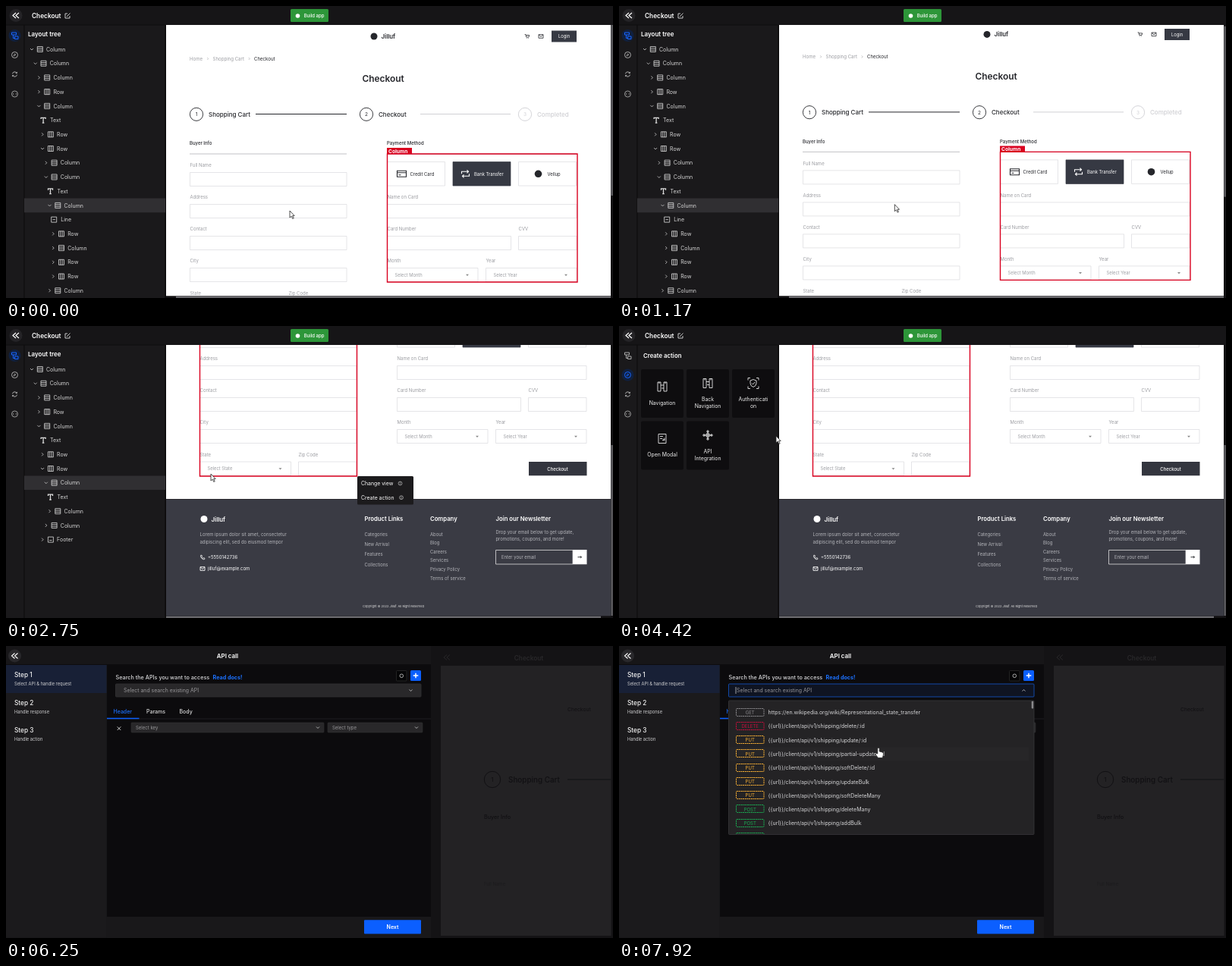
Recreate the animation shown at these times as an HTML page with a canvas. Size 800 px wide and 385 px high, loop 8 s.

```html
<!DOCTYPE html>
<html lang="en">
<head>
<meta charset="utf-8">
<title>App builder walkthrough</title>
<style>
html, body { margin: 0; width: 100%; height: 100%; overflow: hidden; background: #1a191b; }
canvas { display: block; }
</style>
</head>
<body>
<canvas id="stage" width="800" height="385"></canvas>
<script>
const LOOP = 8000;
const ctx = document.getElementById('stage').getContext('2d');
const BAR = '#161517', PANEL = '#1a191b', DARK = '#363943', BLUE = '#0b5fff', RED = '#d9001f',
      INK = '#25262b', LABEL = '#9c9da2', LIGHT = '#dadade', WHITE = '#fff', FOOT = '#b4b5ba';

// Drawing helpers
function text(s, x, y, size, color, weight = 400, align = 'left') {
  ctx.font = `${weight} ${size}px Inter, sans-serif`;
  ctx.fillStyle = color;
  ctx.textAlign = align;
  ctx.textBaseline = 'alphabetic';
  ctx.fillText(s, x, y + size * 0.38);
}
function rect(x, y, w, h, fill, stroke, width = 0.7, r = 0) {
  ctx.beginPath();
  ctx.roundRect(x, y, w, h, r);
  paint(fill, stroke, width);
}
function circle(x, y, r, fill, stroke, width = 0.8) {
  ctx.beginPath();
  ctx.arc(x, y, r, 0, 7);
  paint(fill, stroke, width);
}
function paint(fill, stroke, width) {
  if (fill) { ctx.fillStyle = fill; ctx.fill(); }
  if (stroke) { ctx.strokeStyle = stroke; ctx.lineWidth = width; ctx.stroke(); }
}
function path(d, x, y, stroke, width = 0.9, fill) {
  ctx.save();
  ctx.translate(x, y);
  const p = new Path2D(d);
  if (fill) { ctx.fillStyle = fill; ctx.fill(p); }
  if (stroke) { ctx.strokeStyle = stroke; ctx.lineWidth = width; ctx.stroke(p); }
  ctx.restore();
}
function clipped(x, y, w, h, draw) {
  ctx.save();
  ctx.beginPath();
  ctx.rect(x, y, w, h);
  ctx.clip();
  draw();
  ctx.restore();
}
const hline = (x1, x2, y, color, width) => path(`M${x1} 0H${x2}`, 0, y, color, width);
const chevron = (x, y, open, color, up) =>
  path(up ? 'M-2 1L0-1L2 1' : open ? 'M-2-1L0 1L2-1' : 'M-1-2L1 0L-1 2', x, y, color);

// Eased value from [time, value] stops
function tween(t, stops) {
  let [t0, v0] = stops[0];
  for (const [t1, v1] of stops) {
    if (t < t1) {
      const k = Math.max(0, (t - t0) / (t1 - t0));
      return v0 + (v1 - v0) * k * k * (3 - 2 * k);
    }
    [t0, v0] = [t1, v1];
  }
  return v0;
}

// Icons
const ICON = {
  C: 'M-3.5-3.5H3.5V3.5H-3.5ZM-3.5-1.2H3.5M-3.5 1.2H3.5',
  R: 'M-3.5-3.5H3.5V3.5H-3.5ZM-1.2-3.5V3.5M1.2-3.5V3.5',
  L: 'M-3.5-3.5H3.5V3.5H-3.5ZM-1.7 0H1.7',
  F: 'M-3.5-3.5H3.5V3.5H-3.5ZM-1.7 1H1.7',
  T: 'M-3-1.5V-3.3H3V-1.5M0-3.3V3.5M-1.3 3.5H1.3',
  back: 'M0-3.5L-4 0L0 3.5M4-3.5L0 0L4 3.5',
  edit: 'M0-3H-3V3H3V0M-1 1L3.5-3.5',
  mail: 'M-3-2.3H3V2.3H-3ZM-3-2.3L0 .5L3-2.3',
  cart: 'M-3.3-2.5H-2L-1.3 1H2L2.7-1.5H-1.7M-1 2.5H-.4M1.4 2.5H2',
  phone: 'M-2.3-2.7L-1-2.7L-.5-1L-1.2-.4Q-.4 1 .6 1.3L1.2.6L2.8 1.1V2.4Q1.5 3.5-.8 1.6T-2.3-2.7Z',
  swap: 'M-5 0V-3H4M2-5L4-3L2-1M5 0V3H-4M-2 1L-4 3L-2 5',
  card: 'M-6-4H6V4H-6ZM-6-1.5H6M-4 1.5H-1',
  sync: 'M-3-.6A3 3 0 0 1 2.7-1.4M3 .6A3 3 0 0 1-2.7 1.4M1.2-1.4H2.9V-3.1M-1.2 1.4H-2.9V3.1',
  pages: 'M-6-6H-2V6H-6ZM6-6H2V6H6ZM-2-2H2M-1 2H2M-4-6V-4M4-6V-4',
  shield: 'M0-5L4-3.5V0Q4 3.5 0 5Q-4 3.5-4 0V-3.5ZM-2 0L-.5 1.5L2-1.5M-7-4V-7H-4M7-4V-7H4M-7 4V7H-4M7 4V7H4',
  modal: 'M-5-6H5V6H-5ZM-3-3H1M-3 0H0M1 0L3 2M3-1V2H0',
  hub: 'M0-5V5M-5 0H5M-2-2H2V2H-2ZM-1-6H1V-4H-1ZM-1 4H1V6H-1ZM-6-1H-4V1H-6ZM4-1H6V1H4Z',
  arrow: 'M0 0V9L2.2 7.2L3.8 10.5L5.2 9.8L3.6 6.6H6.2Z',
  hand: 'M-1.2 8V1Q0-1 1.2 1V5L5 6Q7 6.5 6.4 9.5L5.3 13.5H-.5L-4 8.8Q-3.5 7-1.2 8Z'
};
const icon = (name, x, y, color, width) => path(ICON[name], x, y, color, width);

// Tree rows: arrow state, kind, depth; "*" marks the selected row
const HEAD = 'vC0 vC1 >C2 >R2 vC2 -T3 >R3 vR3 ';
const TREES = {
  payment: HEAD + '>C4 vC4 -T5 vC5* -L6 >R6 >C6 >R6 >R6 >C5',
  fields: HEAD + 'vC4 -T5 vC5* -L6 >C6 >C6 >C6 >C6 >R6 >C4',
  buyer: HEAD + 'vC4* -T5 >C5 >C4 >F3'
};
const KIND = { C: 'Column', R: 'Row', T: 'Text', L: 'Line', F: 'Footer' };

function drawTree(name) {
  text('Layout tree', 29, 37, 8, WHITE, 600);
  TREES[name].split(' ').forEach(([arrow, kind, depth, mark], i) => {
    const x = 34 + 4.7 * depth, y = 57 + 18.72 * i, leaf = arrow === '-';
    if (mark) rect(24, y - 9.3, 186, 18.6, '#302f32');
    if (!leaf) chevron(x, y, arrow === 'v', '#bbb');
    icon(kind, x + (leaf ? 1 : 10.8), y, '#ddd', kind === 'T' ? 1.3 : 0.8);
    text(KIND[kind], x + (leaf ? 10 : 19), y, 7, '#d6d6d6');
  });
}

function drawActions() {
  text('Create action', 32, 39, 7.8, WHITE, 600);
  const cards = [['pages', 'Navigation'], ['pages', 'Back', 'Navigation'], ['shield', 'Authenticati', 'on'],
                 ['modal', 'Open Modal'], ['hub', 'API', 'Integration']];
  cards.forEach(([name, ...lines], i) => {
    const x = 29 + 60 * (i % 3), y = i < 3 ? 57 : 125.5;
    rect(x, y, 56, 64, '#0e0d0f', null, 0, 2);
    icon(name, x + 28, y + (lines.length > 1 ? 18.5 : 23), WHITE, 0.8);
    lines.forEach((s, j) =>
      text(s, x + 28, y + (lines.length > 1 ? 39.5 + 9 * j : 44), 6.9, '#eee', 400, 'center'));
  });
}

function drawSidebar(t, actions) {
  rect(0, 0, 800, 25, BAR);
  rect(0, 25, 210, 360, PANEL);
  hline(0, 210, 25, '#0c0b0c', 0.8);
  path('M0 25V385', 24, 0, '#0b0a0b', 1);
  rect(209.5, 25, 1.5, 360, '#0b0a0b');
  circle(13, 12.5, 8.5, '#252427');
  icon('back', 13, 12.5, WHITE, 1.2);
  text('Checkout', 34, 13, 8.3, WHITE, 600);
  icon('edit', 81, 13, '#ddd', 0.9);
  rect(375, 4, 50, 17, '#2d9639', null, 0, 1.5);
  circle(384.5, 13, 2.8, WHITE);
  text('Build app', 406, 13, 6, WHITE, 500, 'center');

  const tint = on => on ? '#1764ff' : '#aaa';
  circle(11.5, actions ? 64.5 : 39, 8, '#10203f');
  path('M-4-4H2V-1H-4ZM-2-1V3.5H0M0 1H4.5V4.5H0Z', 11.5, 39, tint(!actions), 1);
  circle(11.5, 64.5, 4, null, tint(actions), 1);
  path('M-1.5 1.5L0-1.5L1.5-.2Z', 11.5, 64.5, tint(actions), 0.8);
  icon('sync', 11.5, 90, '#aaa', 1);
  circle(11.5, 116, 4, null, '#aaa', 0.9);
  path('M-1.2-1.2L-2.4 0L-1.2 1.2M1.2-1.2L2.4 0L1.2 1.2', 11.5, 116, '#aaa', 0.7);

  if (actions) drawActions();
  else drawTree(t < 1830 ? 'payment' : t < 2620 ? 'fields' : 'buyer');
}

function field(label, x, y, w, option) {
  text(label, x, y, 6, LABEL);
  rect(x, y + 9.5, w, 18, WHITE, LIGHT);
  if (option) {
    text(option, x + 10, y + 18.7, 5.8, LABEL);
    path('M-2-1H2L0 1.2Z', x + w - 14, y + 18.7, null, 0, '#888');
  }
}

function brand(x, y, color) {
  circle(x - 9.5, y, 4.5, color);
  text('Jilluf', x, y, 7.9, color, 600);
}

function drawPage() {
  rect(150, -20, 720, 457, WHITE);
  brand(494.5, 40, INK);
  icon('cart', 687, 40, INK, 0.8);
  icon('mail', 705, 40, INK, 0.8);
  rect(719, 32.5, 33, 15, DARK);
  text('Login', 735.5, 40, 5.8, WHITE, 400, 'center');
  text('Home', 242, 69.3, 6.1, LABEL);
  text('Shopping Cart', 272.5, 69.3, 6.1, LABEL);
  text('Checkout', 327, 69.3, 6.1, INK);
  for (const x of [266, 320.5]) path('M-.7-1.5L.7 0L-.7 1.5', x, 69.5, LABEL, 0.6);
  text('Checkout', 497, 95, 11.9, INK, 600, 'center');

  [[251, 267, 'Shopping Cart', INK], [475, 491, 'Checkout', INK], [684, 700, 'Completed', '#d0d0d4']]
    .forEach(([cx, x, s, color], i) => {
      circle(cx, 142.8, 8.6, WHITE, color, 0.9);
      text(i + 1, cx, 142.8, 6.5, color, 400, 'center');
      text(s, x, 142.8, 8, color, 500);
    });
  hline(329, 449, 142.5, INK, 1);
  hline(546, 665, 142.5, '#d0d0d4', 1);

  text('Buyer Info', 242, 181, 6, INK, 500);
  text('Payment Method', 502, 181, 6, INK, 500);
  hline(242, 449, 195, '#a8a8ac', 0.7);
  hline(502, 752, 195, '#a8a8ac', 0.7);
  ['Full Name', 'Address', 'Contact', 'City'].forEach((s, i) => field(s, 242.5, 210 + 42 * i, 206.5));
  field('State', 242.5, 378.5, 120, 'Select State');
  field('Zip Code', 372.5, 378.5, 76.5);

  ['Credit Card', 'Bank Transfer', 'Vellup'].forEach((s, i) => {
    const x = 502.5 + 86.5 * i, color = i === 1 ? WHITE : INK;
    rect(x, 205.5, 76, 31.5, i === 1 ? DARK : WHITE, i === 1 ? DARK : LIGHT);
    if (i === 2) circle(x + 26, 221.3, 4.8, INK);
    else icon(i ? 'swap' : 'card', x + (i ? 16.5 : 19), 221.3, color, 1.1);
    text(s, x + [30, 28, 38][i], 221.5, 5.9, color);
  });
  field('Name on Card', 502.5, 252, 249.5);
  field('Card Number', 502.5, 294, 163);
  field('CVV', 675.5, 294, 76.5);
  field('Month', 502.5, 336, 119.5, 'Select Month');
  field('Year', 632.5, 336, 119.5, 'Select Year');
  rect(676, 388, 76.5, 18.3, '#34363f');
  text('Checkout', 714, 397.3, 6, WHITE, 500, 'center');
}

function drawFooter() {
  rect(150, 228.5, 720, 160, '#3a3b44');
  brand(270.5, 254.5, WHITE);
  text('Lorem ipsum dolor sit amet, consectetur', 255.5, 275, 6, FOOT);
  text('adipiscing elit, sed do eiusmod tempor', 255.5, 284.5, 6, FOOT);
  icon('phone', 259, 305, WHITE, 0.8);
  icon('mail', 259, 320, WHITE, 0.9);
  text('+5550142736', 266, 305, 6, WHITE);
  text('jilluf@example.com', 266, 320, 6, WHITE);
  const list = (title, x, step, items) => {
    text(title, x, 254.5, 7.7, WHITE, 600);
    items.forEach((s, i) => text(s, x, 274.3 + step * i, 5.9, FOOT));
  };
  list('Product Links', 472.5, 13.4, ['Categories', 'New Arrival', 'Features', 'Collections']);
  list('Company', 559, 11.6, ['About', 'Blog', 'Careers', 'Services', 'Privacy Policy', 'Terms of service']);
  list('Join our Newsletter', 645.5, 0, []);
  text('Drop your email below to get update,', 645.5, 271.5, 5.9, FOOT);
  text('promotions, coupons, and more!', 645.5, 280.5, 5.9, FOOT);
  rect(645.5, 295.5, 101.5, 18.5, null, '#ddd', 0.8);
  text('Enter your email', 653, 305, 5.9, FOOT);
  rect(747, 295, 18.5, 19.3, WHITE);
  path('M-2.5 0H2.5M1-1.5L2.5 0L1 1.5', 756, 304.7, INK, 0.9);
  text('Copyright © 2022 Jilluf. All Right Reserved', 510.5, 369.5, 4, '#ddd', 400, 'center');
}

function selection(x, y, w, h) {
  rect(x, y, w, h, null, RED, 1.4);
  rect(x - 0.5, y - 8, 33, 8, RED);
  text('Column', x + 1.5, y - 3.7, 6.7, WHITE, 700);
}

function drawCanvas(t, panX, scrollY) {
  clipped(211, 25, 586, 357.5, () => {
    ctx.translate(panX, -scrollY);
    drawPage();
    ctx.save();
    ctx.translate(-13, 209);
    drawFooter();
    ctx.restore();
    if (t < 1750) selection(502.5, 195, 250.5, 169);
    else if (t >= 1830 && t < 2620) selection(242.5, 195, 207, 212);
    else if (t >= 2620) selection(242.5, 172, 207, 235);
  });
  rect(797, 25, 3, 360, '#121113');
  rect(797.6, 25 + scrollY * 132 / 209, 2, 225, '#6c6c70');
  rect(211, 382.5, 589, 2.5, '#121113');
  rect(224 - panX, 382.8, 573, 2, '#77777b');
}

function drawMenu() {
  rect(463, 198, 74, 37.5, '#1c1b1d', null, 0, 1.5);
  ['Change view', 'Create action'].forEach((s, i) => {
    const y = 207.5 + 18.7 * i;
    text(s, 468, y, 6.9, WHITE);
    circle(i ? 521 : 519.5, y, 2.4, null, '#ccc', 0.7);
    text('i', i ? 521 : 519.5, y, 3.8, '#ccc', 600, 'center');
  });
}

function drawDropdown() {
  const base = '{{url}}/client/api/v1/shipping/';
  const rows = [['GET', 'https://en.wikipedia.org/wiki/Representational_state_transfer'],
    ['DELETE', base + 'delete/:id'], ['PUT', base + 'update/:id'], ['PUT', base + 'partial-update/:id'],
    ['PUT', base + 'softDelete/:id'], ['PUT', base + 'updateBulk'], ['PUT', base + 'softDeleteMany'],
    ['POST', base + 'deleteMany'], ['POST', base + 'addBulk'], ['POST', base + 'create']];
  const tint = { GET: '#88878a', DELETE: '#c40f3c', PUT: '#f8b035', POST: '#1bab52' };
  rect(144.5, 72, 402.5, 176.5, '#242325', '#39383b', 0.8, 1);
  clipped(145, 72.5, 401.5, 175.5, () => {
    rows.forEach(([method, url], i) => {
      const y = 87.5 + 18.28 * i;
      if (i === 3) rect(145, y - 9, 395, 18.2, '#272628');
      ctx.setLineDash([2, 0.7]);
      rect(154.5, Math.round(y) - 5.5, 36.5, 10, null, tint[method], 1, 1);
      ctx.setLineDash([]);
      text(method, 172.7, y, 6, tint[method], 400, 'center');
      text(url, 196.5, y, 7.02, '#d4d4d6');
    });
    rect(543.7, 72.5, 2.6, 10, '#8a898c', null, 0, 1);
  });
}

function drawApiCall(t) {
  const open = t >= 7150;
  rect(0, 0, 800, 385, '#171618');
  rect(0, 24.5, 132.5, 360, '#1b1a1c');
  rect(133, 24.5, 427, 332.5, '#0c0b0d');
  rect(133, 357, 427, 28, '#19181a');
  hline(0, 560, 24.5, '#0d0c0e', 1);
  circle(11.5, 13, 8.5, '#29282b');
  icon('back', 11.5, 13, WHITE, 1.1);
  text('API call', 292, 12.8, 7.9, WHITE, 600, 'center');

  rect(0, 25, 132.5, 37, '#182036');
  ['Select API & handle request', 'Handle response', 'Handle action'].forEach((s, i) => {
    text('Step ' + (i + 1), 11, 38.3 + 36.4 * i, 8.3, '#f2f2f2', 500);
    text(s, 11, 50 + 36.4 * i, 5.75, '#d0d0d2');
  });

  text('Search the APIs you want to access', 144.5, 41.4, 7.25, '#d8d8da', 500);
  text('Read docs!', 272.5, 41.4, 7.2, '#1c72ff', 700);
  rect(514.5, 32.5, 13.5, 13.5, '#050506', '#2a2a2a', 0.8, 1);
  circle(521.3, 39.3, 2.3, null, '#ccc', 0.8);
  rect(533, 32, 14, 14, BLUE, null, 0, 1.5);
  path('M-3.3 0H3.3M0-3.3V3.3', 540, 39, WHITE, 1.5);

  rect(144.5, 50, 402.5, 17, open ? '#0f1422' : '#29282a', open ? '#1450b8' : '#302f31', 0.9, 1);
  text('Select and search existing API', 155, 58.5, 6.95, '#98979a');
  if (open) path('M0-4.5V4.5', 154, 58.5, '#ddd', 0.7);
  chevron(533.5, 58.5, true, '#bbb', open);

  hline(133, 560, 96, '#242326', 0.8);
  hline(133, 175.5, 95.5, BLUE, 1.3);
  text('Header', 141.5, 86.6, 7, '#1c72ff', 500);
  text('Params', 185, 86.6, 7, '#ddd', 500);
  text('Body', 228.5, 86.6, 7, '#ddd', 500);
  path('M-2.3-2.3L2.3 2.3M2.3-2.3L-2.3 2.3', 149, 108.7, '#ddd', 0.9);
  [[165, 254, 'Select key'], [424, 125, 'Select type']].forEach(([x, w, s]) => {
    rect(x, 101, w, 13, '#29282a', '#302f31', 0.6, 1);
    text(s, x + 6, 107.3, 6, '#98979a');
    chevron(x + w - 8, 107.5, true, '#bbb');
  });
  rect(472, 361.3, 75, 18.2, BLUE, null, 0, 1);
  text('Next', 509.5, 370.5, 7, WHITE, 600, 'center');

  // Dimmed preview behind the sheet
  rect(560, 0, 240, 385, '#141315');
  rect(573, 26, 224.5, 356, '#232224');
  icon('back', 581, 15, '#29282a', 1);
  text('Checkout', 689, 15.5, 8.3, '#29282a', 600, 'center');
  text('Checkout', 740, 83, 6.8, '#111013');
  circle(641, 176, 10.7, null, '#111013', 1);
  text('1', 641, 176, 8, '#111013', 400, 'center');
  text('Shopping Cart', 662, 176, 9.9, '#111013', 500);
  hline(740, 797, 176, '#111013', 1.2);
  text('Buyer Info', 630, 225, 7.2, '#111013', 500);
  text('Full Name', 630, 313.5, 6, '#1c1b1e');

  if (open) drawDropdown();
}

function drawCursor(t) {
  if (t > 5000 && t < 6800) return;
  const x = tween(t, [[0, 374], [1000, 374], [1800, 283], [2170, 283], [2600, 270], [3000, 270],
    [3500, 490], [3720, 490], [4350, 207], [4480, 207], [4800, 117], [6800, 300], [7100, 250], [7300, 250], [7850, 342]]);
  const y = tween(t, [[0, 270], [1000, 270], [1800, 199], [2170, 199], [2600, 195], [3000, 195],
    [3500, 226], [3720, 226], [4350, 145], [4480, 145], [4800, 155], [6800, 160], [7100, 58], [7300, 58], [7850, 134]]);
  const hand = t > 7300 || (t > 3400 && t < 3800) || (t > 4700 && t < 5000);
  path(ICON[hand ? 'hand' : 'arrow'], x, y, '#222', 0.8, WHITE);
}

function render(t) {
  ctx.clearRect(0, 0, 800, 385);
  const sheet = tween(t, [[4900, 0], [5250, 1]]);
  if (sheet < 1) {
    const panX = tween(t, [[2170, 0], [2560, 13]]);
    const scrollY = tween(t, [[170, 0], [700, 3.6], [1000, 3.6], [1500, 0], [2170, 0], [2560, 209]]);
    drawCanvas(t, panX, scrollY);
    drawSidebar(t, t >= 3700);
    if (t >= 2680 && t < 3700) drawMenu();
  }
  if (sheet > 0) {
    ctx.globalAlpha = sheet;
    drawApiCall(t);
    ctx.globalAlpha = 1;
  }
  drawCursor(t);
}

function frame() {
  render(performance.now() % LOOP);
  requestAnimationFrame(frame);
}
frame();
</script>
</body>
</html>
```
